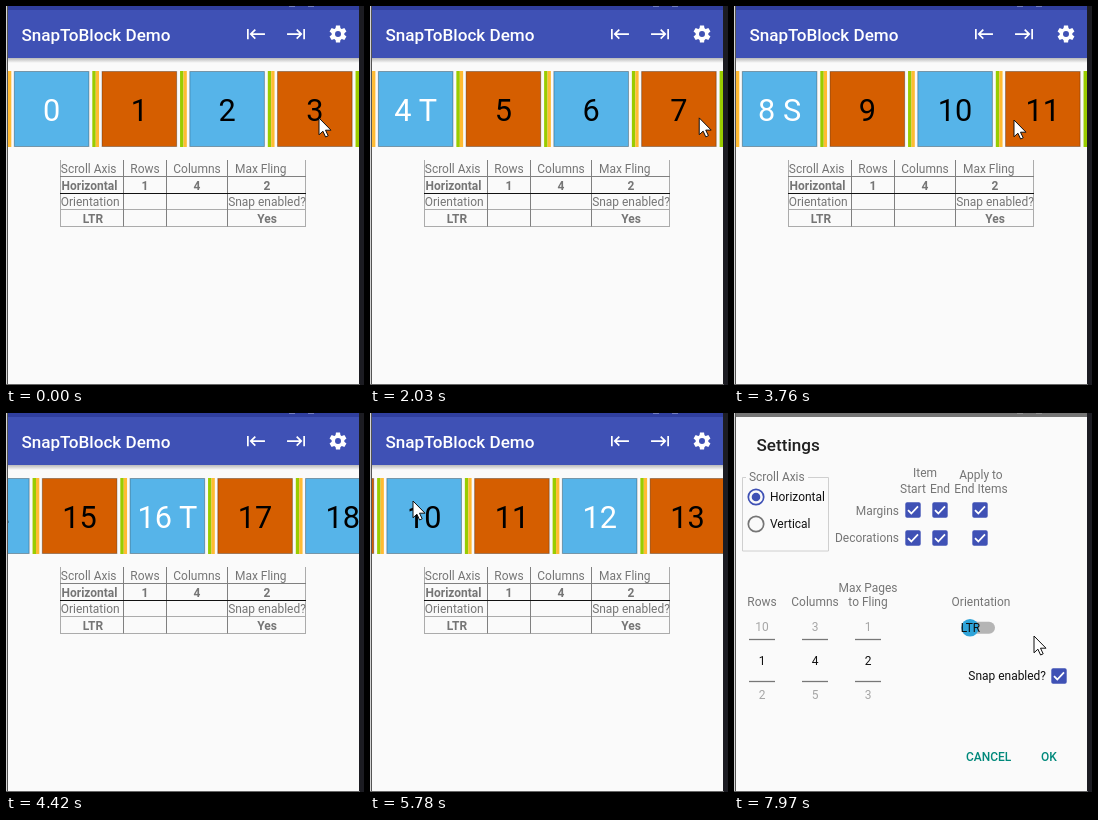
Write an HTML page that moves like this. It is 358 px wide and 379 px high and loops after 8000 ms.

```html
<!DOCTYPE html>
<html lang="en">
<head>
<meta charset="utf-8">
<title>SnapToBlock Demo</title>
<style>
  html, body { margin: 0; width: 100%; height: 100%; overflow: hidden; background: #fafafa; }
  svg { display: block; position: absolute; left: 0; top: 0; }
  text { font: 11.96px Roboto, Arial, sans-serif; fill: #757575; }
  .mid { text-anchor: middle; }
  .end { text-anchor: end; }
  .bold { font-weight: 700; }
  .ink { fill: #111; }
  .faint { fill: #a6a6a6; }
  .title { font-size: 17.1px; font-weight: 500; }
  .action { font-weight: 500; fill: #00897b; }
  .item { font-size: 30.7px; fill: #000; text-anchor: middle; }
  .first { fill: #fff; }
</style>
</head>
<body>
<svg width="358" height="379" viewBox="0 0 358 379">
  <defs>
    <clipPath id="view"><rect x="2" y="60" width="351" height="90"/></clipPath>
    <linearGradient id="shade" x2="0" y2="1">
      <stop stop-color="#000" stop-opacity=".26"/>
      <stop offset="1" stop-color="#000" stop-opacity="0"/>
    </linearGradient>
    <path id="tab" d="M11.59 7.41L15.17 11H1v2h14.17l-3.59 3.59L13 18l6-6-6-6zM20 6v12h2V6z"/>
    <g id="check">
      <rect x="-7.7" y="-7.7" width="15.4" height="15.4" rx="1.8" fill="#3f51b5"/>
      <path d="M-5 .2L-1.7 3.5L5-3.6" fill="none" stroke="#fff" stroke-width="1.8"/>
    </g>
  </defs>
  <rect width="358" height="379" fill="#fafafa"/>

  <!-- app screen -->
  <rect width="353" height="4" fill="#303f9f"/>
  <path d="M283 .5h6M302 .5h6" stroke="#9fa8da" opacity=".6"/>
  <rect y="4" width="353" height="48" fill="#3f51b5"/>
  <rect y="52" width="353" height="5" fill="url(#shade)"/>
  <text x="15.4" y="35" class="title" style="fill:#fff">SnapToBlock Demo</text>
  <g fill="#fff">
    <use href="#tab" transform="translate(259.8 17.8) scale(-.854 .854)"/>
    <use href="#tab" transform="translate(280.2 17.8) scale(.854)"/>
    <g id="gear" transform="translate(332 28) scale(.854)"><circle r="7.4"/></g>
  </g>
  <circle id="ripple" cx="332" cy="28" r="17" fill="#fff" opacity="0"/>
  <g clip-path="url(#view)"><g id="list"></g></g>

  <g fill="none">
    <path d="M54.5 154v66.5M299.5 154v66.5M54 203.5h246M54 220.5h246" stroke="#ababab"/>
    <path d="M117.5 154v66.5M160.5 154v66.5M221.5 154v66.5M54 170.5h246" stroke="#808080"/>
    <path d="M54 187.5h246" stroke="#111"/>
  </g>
  <text x="54.8" y="167">Scroll Axis</text>
  <text x="139" y="167" class="mid">Rows</text>
  <text x="191" y="167" class="mid">Columns</text>
  <text x="229" y="167">Max Fling</text>
  <g class="mid">
    <text x="83.5" y="184" class="bold">Horizontal</text>
    <text x="139" y="184" class="bold">1</text>
    <text x="191" y="184" class="bold">4</text>
    <text x="261" y="184" class="bold">2</text>
    <text x="261" y="200">Snap enabled?</text>
    <text x="87" y="217" class="bold">LTR</text>
    <text x="261" y="217" class="bold">Yes</text>
  </g>
  <text x="54.8" y="200">Orientation</text>

  <!-- settings dialog -->
  <g id="dialog" opacity="0">
    <rect width="353" height="4" fill="#757575"/>
    <path d="M283 .5h6M302 .5h6" stroke="#aaa" opacity=".6"/>
    <g id="sheet">
      <rect x="2" y="4" width="351" height="374" fill="#fafafa"/>
      <text x="22.5" y="38" class="title" style="fill:#212121">Settings</text>
      <path d="M12 64.5H8.5v73.5h86V64.5H74" fill="none" stroke="#cfcfcf"/>
      <text x="15" y="68">Scroll Axis</text>
      <g fill="none" stroke-width="1.7">
        <circle cx="22" cy="84" r="7.7" stroke="#3f51b5"/>
        <circle cx="22" cy="111" r="7.7" stroke="#757575"/>
      </g>
      <circle cx="22" cy="84" r="4.3" fill="#3f51b5"/>
      <text x="36" y="88" class="ink">Horizontal</text>
      <text x="36" y="115" class="ink">Vertical</text>
      <g class="mid">
        <text x="191" y="64">Item</text>
        <text x="179" y="80">Start</text>
        <text x="206" y="80">End</text>
        <text x="247" y="66">Apply to</text>
        <text x="247" y="80">End Items</text>
        <text x="28" y="193">Rows</text>
        <text x="81" y="193">Columns</text>
        <text x="134" y="179">Max Pages</text>
        <text x="134" y="193">to Fling</text>
        <text x="247" y="193">Orientation</text>
      </g>
      <text x="165" y="102" class="end">Margins</text>
      <text x="165" y="129" class="end">Decorations</text>
      <g id="checks"></g>
      <g id="pickers"></g>
      <rect x="230" y="208.7" width="31" height="12" rx="6" fill="#b5b5b5"/>
      <circle cx="236" cy="214.7" r="8.8" fill="#2fa4d9"/>
      <text x="236.5" y="219" class="mid ink">LTR</text>
      <text x="312" y="267" class="end ink">Snap enabled?</text>
      <text x="232" y="348" class="action">CANCEL</text>
      <text x="307" y="348" class="action">OK</text>
    </g>
  </g>

  <!-- window frame -->
  <rect width="1" height="379" fill="#d4d4d4"/>
  <rect x="1" width="1" height="379" fill="#555"/>
  <rect x="353" width="5" height="379" fill="#1c1c22"/>
  <rect y="378" width="354" height="1" fill="#666"/>

  <path id="cursor" d="M0 0V16.8L3.9 13.2L6.6 19L9.2 17.8L6.5 12.2H12Z" fill="#fff" stroke="#111" stroke-width="1"/>
</svg>
<script>
const LOOP = 8000, PITCH = 87.75, COUNT = 21;
const $ = id => document.getElementById(id);

function add(parent, tag, attrs, text) {
  const el = document.createElementNS('http://www.w3.org/2000/svg', tag);
  for (const k in attrs) el.setAttribute(k, attrs[k]);
  if (text !== undefined) el.textContent = text;
  return parent.appendChild(el);
}

for (let a = 0; a < 360; a += 60)
  add($('gear'), 'path', { d: 'M-3-6L-2.4-10H2.4L3-6Z', transform: `rotate(${a})` });
add($('gear'), 'circle', { r: 3.5, fill: '#3f51b5' });

const labels = [];
for (let i = 0; i < COUNT; i++) {
  const g = add($('list'), 'g', { transform: `translate(${2 + i * PITCH} 0)` });
  add(g, 'rect', { x: 0, y: 65, width: 3.3, height: 76, fill: '#ffbb33' });
  add(g, 'rect', { x: 84.3, y: 65, width: 3.45, height: 76, fill: '#99cc00' });
  add(g, 'rect', { x: 6.3, y: 65.5, width: 74.6, height: 75, fill: i % 2 ? '#d55e00' : '#56b4e9',
    stroke: '#000', 'stroke-opacity': .3 });
  labels.push(add(g, 'text', { x: 43.6, y: 114.8, class: i % 4 ? 'item' : 'item first' }, i));
}

for (const y of [97, 125])
  for (const x of [179, 206, 246]) add($('checks'), 'use', { href: '#check', x, y });
add($('checks'), 'use', { href: '#check', x: 325, y: 263 });

[[28, 10, 1, 2], [81, 3, 4, 5], [134, 1, 2, 3]].forEach(([x, ...values]) => {
  values.forEach((v, i) => add($('pickers'), 'text',
    { x, y: 218 + 34 * i, class: i === 1 ? 'mid ink' : 'mid faint' }, v));
  for (const y of [226.5, 268.5])
    add($('pickers'), 'path', { d: `M${x - 13} ${y}h26`, stroke: '#777', 'stroke-width': 1.3 });
});

const clamp = v => Math.max(0, Math.min(1, v));
const part = (t, a, b) => clamp((t - a) / (b - a));
const speedUp = p => p * p;
const slowDown = p => 1 - (1 - p) ** 3;
const smooth = p => p * p * (3 - 2 * p);

// drags speed up, snaps slow down: start, end, from, to, easing
const moves = [
  [790, 1245, 0, 148, speedUp], [1245, 2090, 148, 351, slowDown],
  [2270, 2740, 351, 499, speedUp], [2740, 3330, 499, 702, slowDown],
  [3760, 4145, 702, 1000, speedUp], [4145, 4955, 1000, 1404, slowDown],
  [4980, 5300, 1404, 1214, speedUp], [5300, 6843, 1214, 702, slowDown],
  [5790, 6010, 865, 565, speedUp], [6010, 6480, 565, 0, slowDown]
];

// time, item, mark
const marks = [
  [1245, 4, 'T'], [2090, 4, 'S'], [2740, 8, 'T'], [3330, 8, 'S'], [4145, 16, 'T'],
  [4955, 16, 'S'], [5300, 8, 'T'], [6010, 0, 'T'], [6480, 0, 'S']
];

// time, x, y, easing of the way there
const pointer = [
  [0, 313, 112], [50, 313, 112], [170, 319, 110], [790, 319, 110],
  [1245, 172, 107, speedUp], [1270, 170, 106], [1330, 170, 106], [2090, 332, 112],
  [2270, 332, 112], [2740, 184, 110, speedUp], [2810, 184, 110], [3330, 284, 114],
  [3700, 284, 114], [3760, 280, 114], [4145, -20, 140, speedUp], [4600, -20, 131],
  [4900, 30, 130], [4980, 30, 130], [5300, 220, 105, speedUp], [5360, 220, 105],
  [5740, 43, 88], [5790, 43, 88], [6010, 343, 70, speedUp], [6110, 366, 50],
  [6740, 360, 38], [7140, 333, 29], [7520, 333, 29], [7950, 300, 223], [LOOP, 300, 223]
];

const scrollAt = t => {
  const m = moves.filter(m => m[0] <= t).pop();
  return m ? m[2] + (m[3] - m[2]) * m[4](part(t, m[0], m[1])) : 0;
};

const pointerAt = t => {
  const i = pointer.findIndex(k => k[0] > t);
  const a = pointer[i - 1], b = pointer[i];
  const p = (b[3] || smooth)(part(t, a[0], b[0]));
  return [a[1] + (b[1] - a[1]) * p, a[2] + (b[2] - a[2]) * p];
};

function draw(now) {
  const t = now % LOOP;
  $('list').setAttribute('transform', `translate(${-scrollAt(t)} 0)`);

  const mark = marks.filter(m => m[0] <= t).pop();
  labels.forEach((el, i) => {
    const s = mark && mark[1] === i ? `${i} ${mark[2]}` : `${i}`;
    if (el.textContent !== s) el.textContent = s;
  });

  const press = part(t, 7450, 7560);
  $('ripple').setAttribute('r', 8 + 9 * press);
  $('ripple').setAttribute('opacity', t < 7450 ? 0 : .22 * press);

  const show = part(t, 7560, 7800);
  $('dialog').setAttribute('opacity', show);
  $('sheet').setAttribute('transform', `translate(0 ${14 * (1 - slowDown(show))})`);

  $('cursor').setAttribute('transform', `translate(${pointerAt(t)})`);
}

const start = performance.now();
function tick() {
  draw(performance.now() - start);
  requestAnimationFrame(tick);
}
tick();
</script>
</body>
</html>
```
